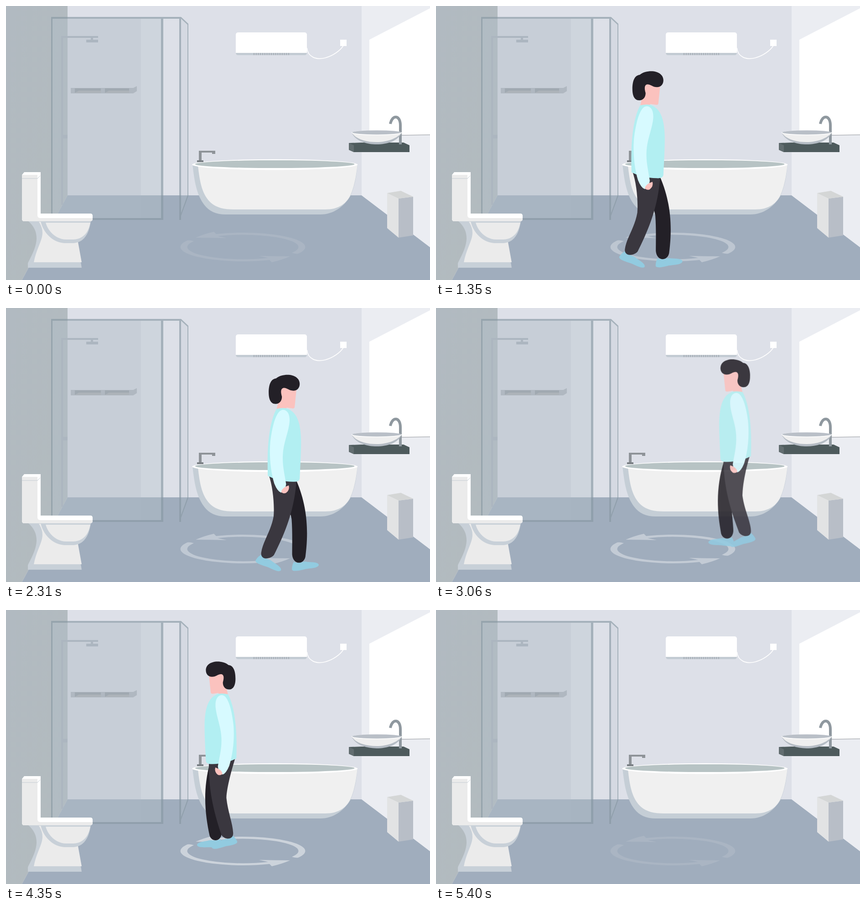
An HTML page that plays this animation: 930x602 px, repeating every 5430 ms.

```html
<!DOCTYPE html>
<html lang="en">
<head>
<meta charset="utf-8">
<title>Bathroom walk</title>
<style>
html, body { margin: 0; width: 100%; height: 100%; overflow: hidden; background: #dde0e8; }
svg { display: block; width: 930px; height: 602px; }
</style>
</head>
<body>
<svg viewBox="0 0 930 602">
  <defs>
    <linearGradient id="wall" x2="1" y2="1">
      <stop offset="0" stop-color="#b1bac1"/><stop offset="1" stop-color="#b3bbbe"/>
    </linearGradient>
    <path id="arrow" d="M398 515 A137 31.5 0 0 0 578 558 L583 563 Q605 558 623 550 Q590 550 555 549 L575 553.5 A122 27 0 0 1 412 516.7 Q404 514 398 515Z"/>
  </defs>

  <!-- room -->
  <path fill="#dde0e8" d="M135 0H780V416H135Z"/>
  <path fill="#a0adbd" d="M135 416H780L930 530V602H35Z"/>
  <path fill="url(#wall)" d="M0 0H135V416L35 602H0Z"/>
  <path fill="#ebedf2" d="M780 0H930V530L780 416Z"/>
  <path fill="#fff" d="M797 74L930 5V283H797Z"/>
  <path stroke="#b0b3b8" stroke-width="1.6" d="M866 284L930 283"/>

  <!-- shower -->
  <g fill="#a7afb9">
    <path d="M121 66H202V70H125V437H121ZM186 70H191V74H202V80H176V74H186ZM125 283H135V291H125Z"/>
  </g>
  <path fill="#b0b4bb" d="M142 180H279L287 176V187L279 192H142Z"/>
  <path fill="#90969b" d="M151 181H208V186H160L151 191ZM217 181H270V186H226L217 191Z"/>
  <path fill="#aaa9ac" d="M160 186H208V191H151ZM226 186H270V191H217Z"/>
  <g fill="#b2bec7">
    <path fill-opacity=".5" d="M102 28H296V466H102Z"/>
    <path fill-opacity=".36" d="M296 28H341V466H296Z"/>
    <path fill-opacity=".2" d="M384 28L398 41V418L384 459Z"/>
  </g>
  <g fill="#8798a4" fill-opacity=".65">
    <path d="M99 24H384L400 39V417L384 461V470H380V28H345V470H99ZM102 28V466H340V28ZM384 28V455L398 416V41Z" fill-rule="evenodd"/>
  </g>

  <!-- heater and socket -->
  <rect x="504" y="58" width="156" height="50" rx="5" fill="#fff"/>
  <path fill="#c3cbd3" d="M504 103H660Q660 108 655 108H509Q504 108 504 103Z"/>
  <path stroke="#a9b0b8" stroke-width="5" stroke-dasharray="2 2.75" d="M543 105.5H622"/>
  <path fill="none" stroke="#fff" stroke-width="1.7" d="M660 92C662 112 680 119 700 114C718 109 733 98 740 87"/>
  <path fill="#fff" d="M733 74H747V88H733Z"/>

  <!-- basin -->
  <path fill="#4e5b5d" d="M752 301L780 300H872L885 306V321H763L752 316Z"/>
  <path fill="#626d70" d="M752 301L763 306V321L752 316Z"/>
  <path fill="none" stroke="#8f989f" stroke-width="6" d="M865 304V262C865 239 847 238 843 259"/>
  <path fill="#b5bcc4" d="M758 278C766 296 790 304 813 304S860 297 868 278Z"/>
  <path fill="#efefef" d="M758 278C768 293 790 299 813 299S858 291 868 278Z"/>
  <ellipse cx="813" cy="278.5" rx="55" ry="5.5" fill="#fff"/>
  <ellipse cx="813" cy="277.8" rx="53.5" ry="4.6" fill="#b9bfc7"/>

  <!-- bin -->
  <path fill="#e2e3e4" d="M836 411L861 423V509L836 488Z"/>
  <path fill="#b8bec7" d="M861 423L893 419V504L861 509Z"/>
  <path fill="#d4d6d6" d="M836 411L866 406L893 419L861 423Z"/>

  <!-- tub -->
  <path fill="#c5ced6" d="M409 347C413 385 418 415 435 437C446 451 460 458 482 458H690C718 458 742 440 755 418C766 395 769 370 771 347Z"/>
  <path fill="#f0f0f0" d="M421 350C425 390 431 415 449 432C461 443 478 447 500 447H700C730 447 748 434 757 412C766 390 769 365 771 347Z"/>
  <ellipse cx="589.7" cy="348.5" rx="181.5" ry="11.8" fill="#fff"/>
  <ellipse cx="589.7" cy="347.5" rx="175" ry="8.6" fill="#b7c3c4"/>
  <path fill="#8e9398" d="M423 318H459V325H452V322H429V340H423Z"/>
  <path fill="#787e83" d="M419 339H433V343H419Z"/>

  <!-- toilet -->
  <path fill="#c8d0d8" d="M48 472H185V476H166V575H48V565C60 540 84 502 48 472Z"/>
  <path fill="#a0adbd" d="M157 519L187 474H192V575H166Z"/>
  <path fill="#ebebeb" d="M72 474C92 505 69 520 61 563H166L158 519L130 500L78 474Z"/>
  <path fill="#c8d0d8" d="M76 473C82 500 105 521 130 521H148C172 519 182 500 186 473Z"/>
  <path fill="#ebebeb" d="M87 476C92 495 110 513 132 513H148C170 512 181 497 185 476Z"/>
  <path fill="#fff" d="M35 371L40 365H76V456H185Q190 456 190 461V468Q190 473 184 473H40Q35 473 35 468Z"/>
  <path fill="#ebebeb" d="M35 371H69V460Q69 466 76 466H190V468Q190 473 184 473H40Q35 473 35 468Z"/>
  <path fill="none" stroke="#c5ccd3" d="M35 379H69L75 373"/>

  <g id="ring" fill="#fff">
    <use href="#arrow"/>
    <use href="#arrow" transform="rotate(180 519.5 529.5)"/>
  </g>
  <g id="going"></g>
  <g id="coming"></g>
</svg>

<script>
const LOOP = 5430;
const DARK = '#232027', GREY = '#3a373f', SKIN = '#fbc2be', SHOE_FILL = '#92cbe0';

const SHOE = 'M-9 -1C3 4 10 -3 20 -1C30 0 45 -1 46 6C44 13 30 13 16 15C4 18 -13 22 -13 15Q-13 7 -9 -1Z';
const HAIR = 'M383 153C390 147 400 145 408 145C424 145 435 153 435 165C435 174 429 180 421 180C411 180 407 173 399 174C392 176 394 186 396 193C396 203 390 209 382 209C371 209 367 198 367 184C367 166 372 154 383 153Z';
const FACE = 'M392 171L428 176L424 215Q424 219 420 219L406 217L405 222H384L389 200Z';
const SHIRT = 'M384 220Q396 217 407 219C428 227 437 247 438 290C438 320 436 350 435 373Q434 381 420 380C400 380 380 375 365 367C364 330 363 260 384 220Z';
const ARM = 'M398 222C410 222 415 236 413 254C411 275 403 295 403 320C403 345 410 365 414 385Q413 400 404 404Q396 402 388 385C377 355 373 320 374 292C376 260 383 222 398 222Z';
const HAND = 'M420 387Q423 397 415 404Q408 407 404 402Q406 392 420 387Z';

// Two poses per leg: near leg ahead, then near leg behind. foot = x, y, tilt.
const FAR_LEG = {
  fill: DARK,
  poses: ['M372 366C376 395 376 420 373 444C368 470 346 512 342 532C340 549 360 549 366 541C384 505 412 455 420 374Z',
          'M370 366C378 395 413 430 417 462C419 490 418 520 418 540C420 563 443 563 447 545C453 500 455 440 427 376Z'],
  foot: ['352 545 30', '430.5 557 0']
};
const NEAR_LEG = {
  fill: GREY,
  poses: ['M368 366C372 395 407 437 417 462C422 490 430 525 435 546C439 562 456 562 459 546C459 500 449 430 428 372Z',
          'M367 365C376 390 380 430 378 456C372 490 354 512 351 536C349 553 371 551 379 541C396 506 424 450 428 374Z'],
  foot: ['449 556 0', '358 546 31']
};

const NUM = /-?\d+(\.\d+)?/g;
const mix = ([a, b], k) => {
  const to = b.match(NUM);
  let i = 0;
  return a.replace(NUM, n => (+n + (to[i++] - n) * k).toFixed(2));
};

function add(parent, d, fill) {
  const el = document.createElementNS('http://www.w3.org/2000/svg', 'path');
  el.setAttribute('d', d);
  el.setAttribute('fill', fill);
  parent.append(el);
  return el;
}

function makeWalker(id) {
  const group = document.getElementById(id);
  const legs = [FAR_LEG, NEAR_LEG].map(leg => ({
    ...leg,
    shoe: add(group, SHOE, SHOE_FILL),
    shape: add(group, leg.poses[0], leg.fill)
  }));
  add(group, FACE, SKIN);
  add(group, SHIRT, '#b2eff2');
  add(group, HAIR, DARK);
  const arm = [add(group, ARM, '#d7faff'), add(group, HAND, SKIN)];

  // stride: 1 = near leg fully ahead, -1 = fully behind
  return (stride, transform, opacity) => {
    group.setAttribute('opacity', opacity);
    group.setAttribute('transform', transform);
    const k = (0.91 - stride) / 1.59;
    for (const leg of legs) {
      const [x, y, tilt] = mix(leg.foot, k).split(' ');
      leg.shape.setAttribute('d', mix(leg.poses, k));
      leg.shoe.setAttribute('transform', `translate(${x} ${y}) rotate(${tilt})`);
    }
    const swing = `rotate(${(0.91 - stride) * 2.1} 398 235)`;
    for (const part of arm) part.setAttribute('transform', swing);
  };
}

const clamp = v => Math.max(0, Math.min(1, v));
const fade = (t, start, end) => clamp(Math.min(t - start, end - t) / 300);
const wave = (t, peak, period) => Math.cos((t - peak) / period * 2 * Math.PI);

const ring = document.getElementById('ring');
const going = makeWalker('going');
const coming = makeWalker('coming');

function draw(t) {
  ring.setAttribute('opacity', 0.3 - 0.2 * wave(t, 0, LOOP / 3));

  let s = wave(t, 995, 960);
  let x = 0.1515 * (t - 930);
  let y = 0.0035 * (t - 930) + 9 * (s * s - 0.83);
  going(s, `translate(${x} ${y})`, fade(t, 90, 2755));

  s = wave(t, 4625, 930);
  x = 503.5 + 0.1438 * (4350 - t);
  y = 111.4 + 0.001 * (t - 3060) + 8 * s * s;
  coming(s, `translate(${x} ${y}) scale(-.955 .958) translate(-367 -145)`, fade(t, 2800, 5350));
}

const start = performance.now();
function tick() {
  draw((performance.now() - start) % LOOP);
  requestAnimationFrame(tick);
}
tick();
</script>
</body>
</html>
```
